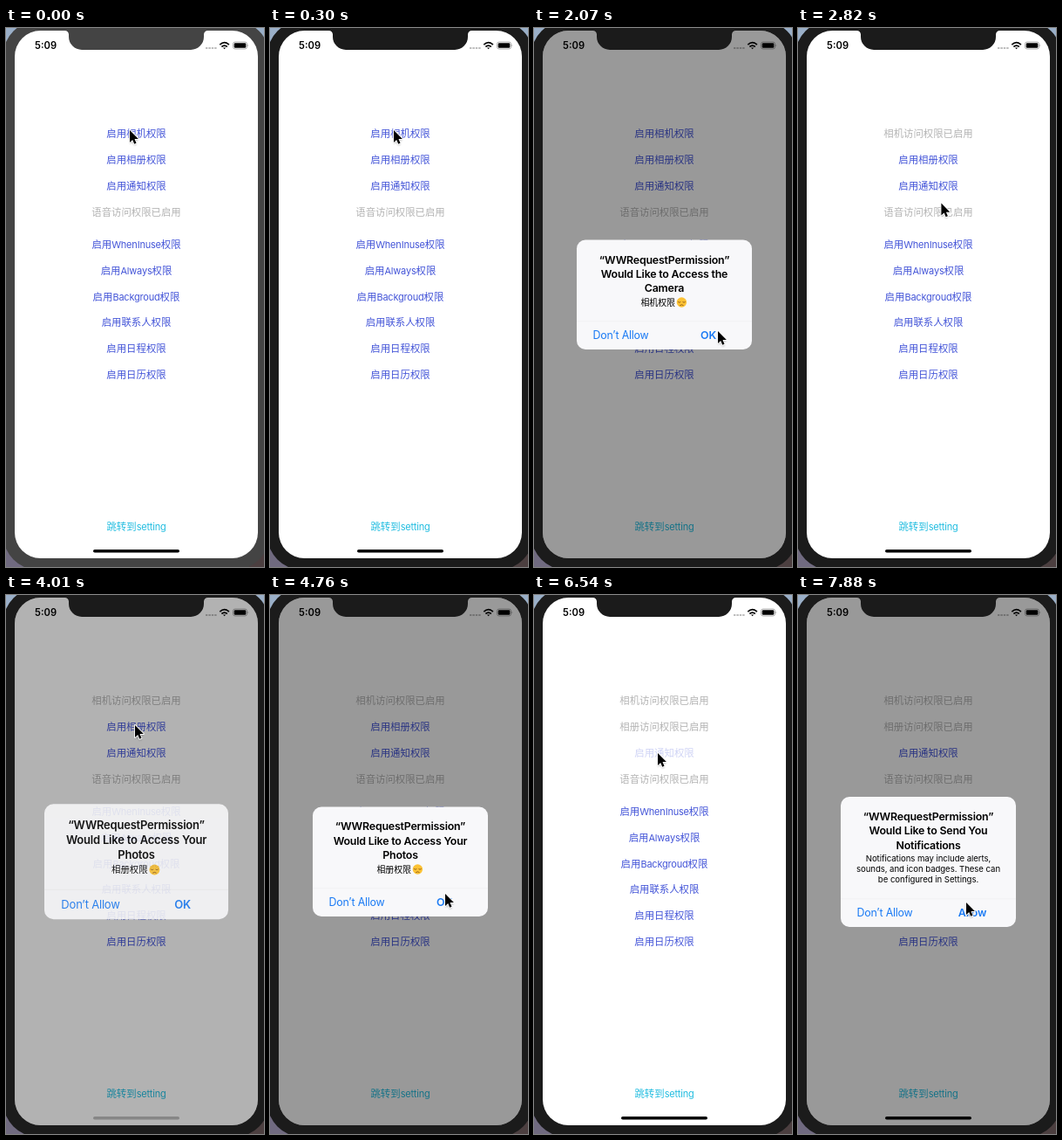
An HTML page that plays this animation: 296 px wide and 617 px high, repeating every 8000 ms.

```html
<!DOCTYPE html>
<html lang="zh-CN">
<head>
<meta charset="utf-8">
<title>Permission requests</title>
<style>
  html, body { margin: 0; width: 296px; height: 617px; overflow: hidden; }
  svg { display: block; }
  text { font-family: Inter, "Noto Sans CJK SC", "Noto Sans CJK", sans-serif; text-anchor: middle; }
  .row { font-size: 11.4px; font-weight: 300; fill: #4455d8; }
  .row.done { fill: #b4b4b4; }
  .row.link { fill: #22bde0; }
  .row tspan { font-size: 11px; font-weight: 400; letter-spacing: -.2px; }
  .clock { font-size: 11.2px; font-weight: 600; }
  .title, .button { font-size: 12.4px; letter-spacing: -.2px; }
  .title, .main { font-weight: 600; }
  .button { fill: #1a7af4; }
  .note { font-size: 9.6px; letter-spacing: -.05px; }
  .hanzi { font-size: 9.9px; }
</style>
</head>
<body>
<svg width="296" height="617" viewBox="0 0 296 617">
  <defs>
    <clipPath id="glass"><rect x="10" y="3" width="279" height="604" rx="29.5"/></clipPath>
    <filter id="soft" x="-50%" y="-50%" width="200%" height="200%"><feGaussianBlur stdDeviation="1"/></filter>
    <path id="arrow" d="M0 0V14L3.2 11L5.2 15.8L7.5 14.8L5.5 10.1H9.9Z"/>
  </defs>

  <rect width="296" height="300" fill="#9aafc8"/>
  <rect y="300" width="148" height="317" fill="#706a80"/>
  <rect x="148" y="300" width="148" height="317" fill="#4c3f40"/>
  <rect id="body" x="-4" y="-9" width="307" height="630" rx="43"/>

  <g clip-path="url(#glass)">
    <rect x="10" y="3" width="279" height="604" fill="#fff"/>
    <g id="rows"></g>
    <text class="clock" x="45.6" y="24">5:09</text>
    <path d="M229 23H242" stroke="#bdbdbd" stroke-width="2" stroke-dasharray="2.4 1"/>
    <path d="M245.3 19.2Q250.6 14.2 255.9 19.2M247.4 21.5Q250.6 18.6 253.8 21.5" fill="none" stroke="#000" stroke-width="1.7"/>
    <path d="M249 22.6H252.2L250.6 24.3Z"/>
    <rect x="260.5" y="16" width="16" height="8" rx="2.3" fill="none" stroke="#999" stroke-width=".8"/>
    <rect x="261.7" y="17.2" width="13.6" height="5.6" rx="1.3"/>
    <path d="M277.6 18.6Q279 20 277.6 21.4Z" fill="#888"/>
    <rect id="dim" x="10" y="3" width="279" height="604"/>
    <g id="alert"></g>
    <rect id="bar" x="100" y="597" width="99" height="3.6" rx="1.8"/>
  </g>

  <path id="notch" d="M67.5 2V3A4.5 4.5 0 0 1 72 7.5V10A15 15 0 0 0 87 25H212A15 15 0 0 0 227 10V7.5A4.5 4.5 0 0 1 231.5 3V2Z"/>
  <g id="cursor">
    <use href="#arrow" y="1.5" opacity=".4" filter="url(#soft)"/>
    <use href="#arrow" stroke="#fff" stroke-width="1.8" stroke-linejoin="round"/>
    <use href="#arrow"/>
  </g>
</svg>

<script>
const $ = id => document.getElementById(id);
const LOOP = 8000, TICK = 148.6;

const labels = ['启用相机权限', '启用相册权限', '启用通知权限', '语音访问权限已启用',
  '启用WhenInuse权限', '启用Always权限', '启用Backgroud权限',
  '启用联系人权限', '启用日程权限', '启用日历权限', '跳转到setting'];
const rowY = i => i === 10 ? 571 : 121 + 29.8 * i + (i > 3 ? 7.5 : 0);
const latin = s => s.replace(/[a-z]+/gi, '<tspan>$&</tspan>');
const line = (cls, x, mid, s, drop) => `<text class="${cls}" x="${x}" y="${mid + drop}">${s}</text>`;
$('rows').innerHTML = labels.map((s, i) => line('row', 149.5, rowY(i), latin(s), 4.3)).join('');
const rows = [...$('rows').children];
rows[3].classList.add('done');
rows[10].classList.add('link');

const face = `<circle cx="169.4" cy="314" r="5.7" fill="#fcc235"/>
  <path d="M165.4 313.6q1.3 1.4 2.6 .2m2.8 0q1.4 1.2 2.6 -.2m-5.8 3.8q1.8 -1.4 3.6 0"
    fill="none" stroke="#7a4a12" stroke-width=".8" stroke-linecap="round"/>`;

function alertBox(top, height, title, body, ok) {
  const end = top + height;
  return `<rect x="49" y="${top}" width="201" height="${height}" rx="10" fill="#f8f8fa"/>
    <path d="M49 ${end - 32.2}H250" stroke="#ebebee" stroke-width=".6"/>` +
    ['“WWRequestPermission”', ...title].map((s, i) => line('title', 149.5, top + 22.6 + i * 16.4, s, 4.4)).join('') +
    body +
    line('button', 99.5, end - 16.2, 'Don’t Allow', 4.4) +
    line('button main', 200, end - 16.2, ok, 4.4);
}
const access = (title, what) => alertBox(242.5, 125.5, title, line('hanzi', 142.2, 314, what, 3.7) + face, 'OK');
const notes = ['Notifications may include alerts,', 'sounds, and icon badges. These can', 'be configured in Settings.'];

// Times are in ticks; row i is pressed, then its alert opens and closes.
const requests = [
  { press: 1, open: 2, close: 13, granted: '相机访问权限已启用',
    box: access(['Would Like to Access the', 'Camera'], '相机权限') },
  { press: 26, open: 26, close: 35, granted: '相册访问权限已启用',
    box: access(['Would Like to Access Your', 'Photos'], '相册权限') },
  { press: 44, open: 46, close: Infinity,
    box: alertBox(231, 149, ['Would Like to Send You', 'Notifications'],
      notes.map((s, i) => line('note', 149.5, 301.5 + i * 12, s, 3.4)).join(''), 'Allow') }
];
const moves = [
  { from: 4, to: 7, x: 211, y: 347 },
  { from: 17, to: 24, x: 148, y: 149 },
  { from: 28, to: 32, x: 201, y: 342 },
  { from: 36, to: 42, x: 142, y: 181 },
  { from: 48, to: 53, x: 193, y: 352 }
];

const clamp = v => Math.min(1, Math.max(0, v));
const easeOut = v => 1 - (1 - clamp(v)) ** 4;

function pointer(k) {
  let x = 142, y = 117;
  for (const m of moves) {
    const e = easeOut((k - m.from) / (m.to - m.from));
    x += (m.x - x) * e;
    y += (m.y - y) * e;
  }
  return `translate(${x} ${y})`;
}

const appear = (r, k) => 1 - .25 ** Math.max(0, k - r.open);
const vanish = (r, k) => clamp(1 - .42 * Math.max(0, k - r.close));

let last = -1, current;
function draw(k) {
  const shell = k < 1 ? '#444' : '#1b1b1b';
  $('body').setAttribute('fill', shell);
  $('notch').setAttribute('fill', shell);

  requests.forEach((r, i) => {
    const done = k >= r.close + 3;
    rows[i].textContent = done ? r.granted : labels[i];
    rows[i].classList.toggle('done', done);
    rows[i].setAttribute('opacity', k >= r.press && k < Math.max(r.open, r.press + 1) ? .25 : 1);
  });

  const r = requests.find(q => k < q.close + 3);
  if (r !== current) $('alert').innerHTML = (current = r).box;
  const grown = appear(r, k), p = grown * vanish(r, k);
  const scale = 1.2 - .2 * grown;
  $('alert').setAttribute('opacity', grown ? (1 + grown) / 2 * vanish(r, k) : 0);
  $('alert').setAttribute('transform', `translate(149.5 305.4) scale(${scale}) translate(-149.5 -305.4)`);
  $('dim').setAttribute('opacity', .4 * p);
  $('bar').setAttribute('opacity', r.granted ? 1 - p : 1);
  $('cursor').setAttribute('transform', pointer(k));
}

function tick(now) {
  const k = Math.floor((now % LOOP + 5) / TICK);
  if (k !== last) draw(last = k);
  requestAnimationFrame(tick);
}
draw(0);
requestAnimationFrame(tick);
</script>
</body>
</html>
```
